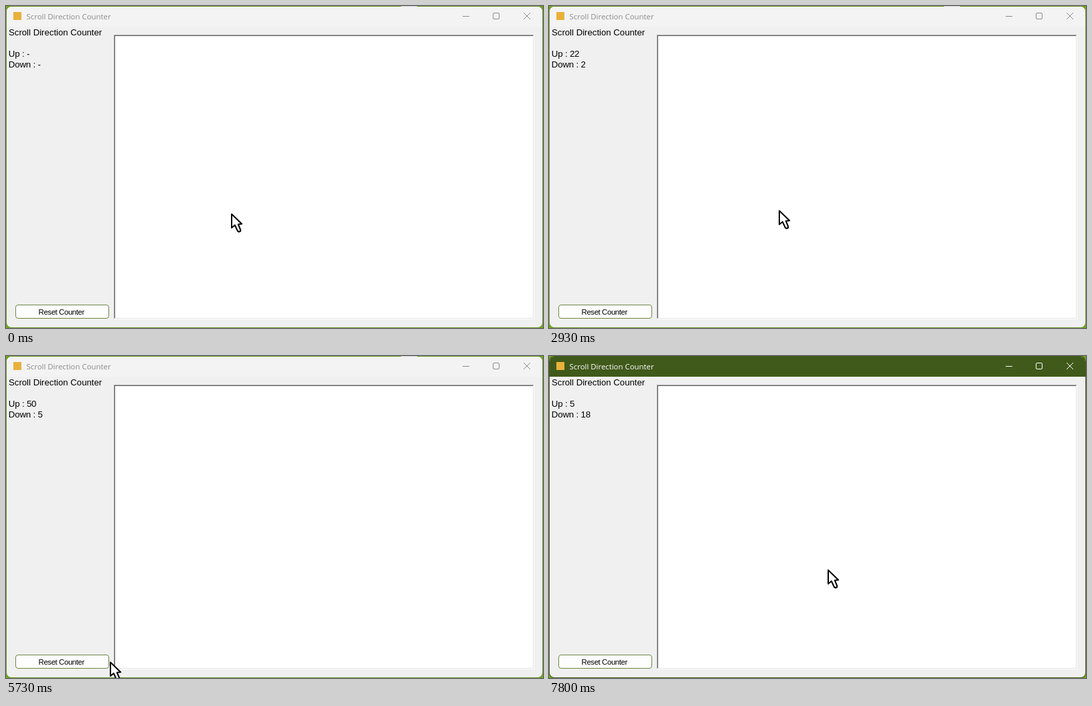
An HTML page with a canvas for the animation above (8 s loop, 802 px wide and 482 px high).

```html
<!DOCTYPE html>
<html lang="en">
<head>
<meta charset="utf-8">
<title>Scroll Direction Counter</title>
<style>
html, body { margin: 0; width: 100%; height: 100%; overflow: hidden; background: #6a9f1d; }
canvas { display: block; width: 802px; height: 482px; }
</style>
</head>
<body>
<canvas id="stage" width="802" height="482"></canvas>
<script>
const W = 802, H = 482, LOOP = 8000, TICK = 200 / 3;
const ACTIVATE = 90, RESET = 92;
const ctx = document.getElementById('stage').getContext('2d', { alpha: false });

// The wheel is flicked at a steady pace; each flick spreads its notches over a few ticks.
const PACE = 6.75, SPIN = 4;
const ups = [1, 2, 1, 3, 6, 4, 5, 4, 6, 5, 5, 8, 0, 0, 0, 4, 1, 0];
const downs = { 6: 2, 10: 2, 11: 1, 15: 7, 16: 4, 17: 7 };

// Pointer moves: first tick, last tick, end point
const home = [336, 310];
const moves = [
  [0, 3, 343, 305], [82, 86, 155, 457], [86, 90, 142, 460], [92, 98, 416, 319]
];

const clamp = v => Math.min(1, Math.max(0, v));
const easeOut = t => 1 - (1 - t) ** 2;

function countAt(tick) {
  let up = 0, down = 0;
  ups.forEach((n, k) => {
    const start = Math.floor(k * PACE);
    if (tick >= RESET && start < RESET) return;
    const part = clamp((tick - start + 1) / SPIN);
    up += Math.floor(n * part);
    down += Math.floor((downs[k] || 0) * part);
  });
  return up + down ? { up, down } : { up: '-', down: '-' };
}

function pointerAt(tick) {
  let [x, y] = home;
  for (const [from, to, tx, ty] of moves) {
    const p = easeOut(clamp((tick - from) / (to - from)));
    x += (tx - x) * p;
    y += (ty - y) * p;
  }
  return [Math.round(x), Math.round(y)];
}

function rect(x, y, w, h, color) {
  ctx.fillStyle = color;
  ctx.fillRect(x, y, w, h);
}

function rounded(x, y, w, h, r) {
  ctx.beginPath();
  ctx.roundRect(x, y, w, h, r);
}

function line(...pts) {
  ctx.beginPath();
  pts.forEach(([x, y]) => ctx.lineTo(x, y));
}

function text(str, x, y, size, { color = '#000', family = '"Liberation Sans", Arial', spacing = 0 } = {}) {
  ctx.font = `${size}px ${family}, sans-serif`;
  ctx.letterSpacing = spacing + 'px';
  ctx.fillStyle = color;
  ctx.fillText(str, x, y);
}

function drawFrame(active) {
  const dark = '#405a1b', ink = active ? '#fff' : '#8b8b8b';
  rect(0, 0, W, H, '#6fa81c');
  rounded(0, 0, W, H, 8);
  ctx.fillStyle = active ? dark : 'rgba(90,120,50,0.4)';
  ctx.fill();
  if (!active) rect(590, 0, 24, 1, '#d0d0d0');

  ctx.save();
  rounded(1, 1, W - 2, H - 2, 7);
  ctx.clip();
  rect(0, 0, W, H, '#f0f0f0');
  rect(0, 0, W, 31, active ? dark : '#f3f3f3');
  ctx.restore();

  rect(11, 9, 12, 12, '#e8b13c');
  text('Scroll Direction Counter', 30.6, 20, 11.4, { color: ink, family: '"Open Sans", "Noto Sans"' });

  ctx.strokeStyle = ink;
  ctx.lineWidth = 1;
  line([682, 15.5], [692, 15.5]);
  ctx.stroke();
  rounded(727.5, 10.5, 9, 9, 1.5);
  ctx.stroke();
  line([773, 10], [783, 20]);
  ctx.stroke();
  line([783, 10], [773, 20]);
  ctx.stroke();
}

function drawPanel() {
  rect(161, 43, 628, 426, '#fff');
  rect(161, 43, 627, 1, '#a0a0a0');
  rect(161, 43, 1, 425, '#a0a0a0');
  rect(162, 44, 625, 1, '#696969');
  rect(162, 44, 1, 423, '#696969');
  rect(162, 467, 626, 1, '#e3e3e3');
  rect(787, 44, 1, 424, '#e3e3e3');
}

function drawButton(hot) {
  rounded(14.5, 447.5, 139, 20, 3.5);
  ctx.fillStyle = hot ? '#e2e9d5' : '#fdfdfd';
  ctx.fill();
  ctx.strokeStyle = hot ? '#4c6a25' : '#6b8743';
  ctx.lineWidth = 1;
  ctx.stroke();
  text('Reset Counter', 48.6, 462, 11.4, { spacing: -0.4 });
}

function drawPointer(x, y) {
  ctx.save();
  ctx.translate(x, y);
  line([1, 1.5], [1, 22], [5.8, 18], [10, 27], [12, 28], [14.2, 27], [14.2, 25], [10.8, 16.8], [16.2, 16.2]);
  ctx.closePath();
  ctx.fillStyle = '#fff';
  ctx.fill();
  ctx.strokeStyle = '#000';
  ctx.lineWidth = 2;
  ctx.lineJoin = 'round';
  ctx.stroke();
  ctx.restore();
}

function draw(ms) {
  const tick = Math.floor((ms % LOOP + 4) / TICK);
  const { up, down } = countAt(tick);
  const [x, y] = pointerAt(tick);

  drawFrame(tick >= ACTIVATE);
  text('Scroll Direction Counter', 4, 44, 13.2);
  text('Up : ' + up, 3.8, 76, 13.3, { spacing: -0.2 });
  text('Down : ' + down, 3.8, 92, 13.3, { spacing: -0.2 });
  drawPanel();
  drawButton(x < 154 && y >= 447);
  drawPointer(x, y);
}

const begin = performance.now();
function loop() {
  draw(performance.now() - begin);
  requestAnimationFrame(loop);
}
loop();
</script>
</body>
</html>
```
